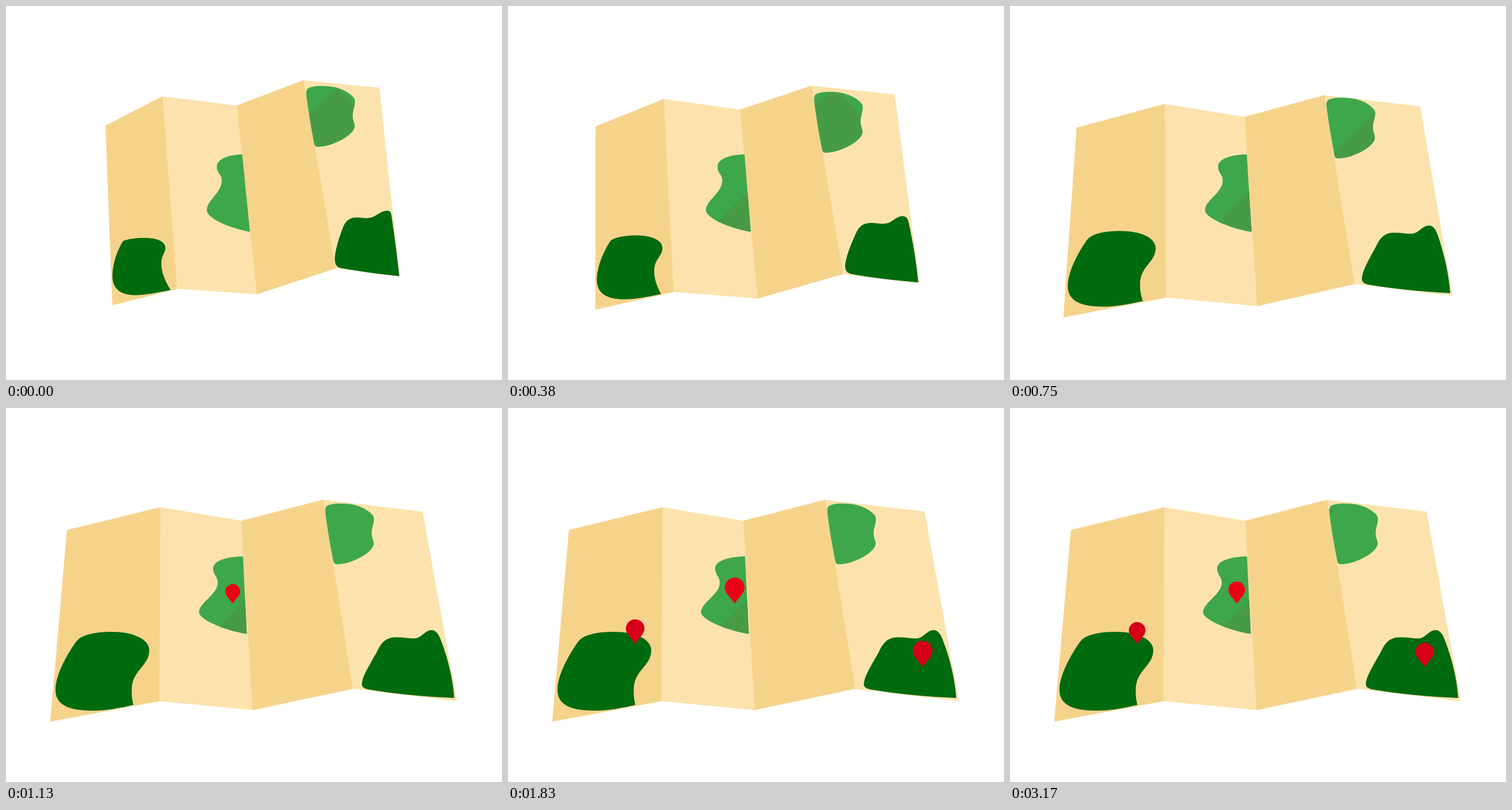
Animation, 862 px wide and 650 px high, one loop 6.58 s. Source, as an HTML page with a canvas:

```html
<!DOCTYPE html>
<html lang="en">
<head>
<meta charset="utf-8">
<title>Unfolding map</title>
<style>
  html, body { margin: 0; width: 100%; height: 100%; overflow: hidden; background: #fff; }
  canvas { display: block; }
</style>
</head>
<body>
<canvas id="stage" width="862" height="650"></canvas>
<script>
const ctx = document.getElementById('stage').getContext('2d');
const LOOP = 6580, FPS = 24, LAST_FRAME = 76, UNFOLD_FRAMES = 24;

const COLOR = {
  paper: '#fce3ad', fold: '#f6d38b', forest: '#006a0f',
  meadow: '#3ea74b', shade: '#479b46'
};

// Each shape is a pair: folded and unfolded.
const topEdge = ['173,208 272,157 401,173 517,129 649,142',
                 '106,212 268.5,172.5 409,196 551,159.5 724,180'];
const bottomEdge = ['185,520 297.5,491.5 436,501 573,456 684,470',
                    '77,545 266.5,509.5 428.5,525 603,488 783.5,509.5'];

const leftForest = [
  'M204,408 C212,405 226,403 240,403 C262,403 277,409 277,420 C277,430 270,433 270,447 ' +
  'C270,463 276,477 286,493.5 C264,498 243,502.5 225,502.5 C200,502.5 185,492 185,470 C185,448 194,422 204,408Z',
  'M122,406 C132,393 158,389 183,389 C222,389 249,402 249,421 C249,449 218.5,455 218.5,490 ' +
  'C218.5,500 219,507 221.5,516 C200,521 175,526 150,526 C108,526 86,515 86,490 C86,463 107,427 122,406Z'];
const rightForest = [
  'M571.5,440 C571.5,425 581,396 586,384 C591,372 598,368 609,367.5 C618,367 623,370 633,368 ' +
  'C643,366 650,357 660,356 C667,355 669,358 670,365 C675,400 680,435 683.5,469.5 C648,466 612,461 580,455 C574,453 571.5,448 571.5,440Z',
  'M618.5,480 C618.5,466 636,440 645,423 C652,408 660,399 676,398.5 C690,398 701,401 711,400.5 ' +
  'C723,399 727,387 739,386 C747,385.5 752,393 756,404 C768,435 777,472 779,504 C730,502 675,497 629,489 C622,487 618.5,485 618.5,480Z'];
const middleMeadow = [
  'M410.5,258 C392,258 366,264 366.5,280 C367,292 375,292 375,303 C375,325 349,337 349,355 C349,369 388,386 424,392.5Z',
  'M412,258 C388,258 360,264 360,279 C360,291 368,292 368,304 C368,324 335.5,338 335.5,355 C335.5,367 377,386 418.5,392.5Z'];
const rightMeadow = new Path2D(
  'M522,155 C521,146 523,142 532,140.5 C543,138 560,139 571,141 C588,145 600,153 605.5,161 ' +
  'C609,170 602,180 602.5,192 C603,201 606,202 606,209 C605,224 570,243 545,244.5 ' +
  'C539,245 537.5,244 536,240 C531,215 525,180 522,155Z');

// Unit pin: head radius 1, tip at the origin.
const pinShape = new Path2D('M0,0 C-.42,-.65 -1,-1.05 -1,-1.63 A1,1 0 0 1 1,-1.63 C1,-1.05 .42,-.65 0,0Z');
const pins = [
  { x: 394, y: 340, radius: 17.4, start: 24, color: '#ee0014' },
  { x: 221, y: 410, radius: 17.2, start: 32, color: '#d60018' },
  { x: 720.7, y: 450, radius: 19, start: 40, color: '#d60018' }
];

const clamp = v => Math.min(1, Math.max(0, v));
const lerp = (a, b, k) => a + (b - a) * k;
const easeSine = k => (1 - Math.cos(Math.PI * clamp(k))) / 2;

function morph([from, to], k) {
  const ends = to.match(/[\d.]+/g);
  let i = 0;
  return from.replace(/[\d.]+/g, v => lerp(+v, +ends[i++], k));
}

function keyed(frame, keys) {
  for (let i = 1; i < keys.length; i++) {
    const [f0, v0] = keys[i - 1], [f1, v1] = keys[i];
    if (frame <= f1) return lerp(v0, v1, (frame - f0) / (f1 - f0));
  }
  return keys[keys.length - 1][1];
}

function fill(path, color) {
  ctx.fillStyle = color;
  ctx.fill(path);
}

// Shades the part of a meadow where x + y > sum and x - y < diff.
function drawMeadow(path, sum, diff = 900) {
  fill(path, COLOR.meadow);
  const x = (sum + diff) / 2, y = (sum - diff) / 2, far = 900;
  ctx.save();
  ctx.clip(path);
  fill(new Path2D(`M${x},${y} l${far},${far} h${-2 * far}Z`), COLOR.shade);
  ctx.restore();
}

function drawPaper(open) {
  const top = morph(topEdge, open).split(' ');
  const bottom = morph(bottomEdge, open).split(' ');
  const polygon = points => new Path2D(`M${points.join('L')}Z`);
  fill(polygon([...top, ...bottom.slice().reverse()]), COLOR.paper);
  for (const i of [0, 2]) {
    fill(polygon([top[i], top[i + 1], bottom[i + 1], bottom[i]]), COLOR.fold);
  }
}

function pinScale(age) {
  const peak = 7.5, overshoot = .16;
  if (age <= 0) return 0;
  if (age < peak) return (1 + overshoot) * (1 - (1 - age / peak) ** 2);
  if (age < 28) {
    const since = age - peak;
    return 1 + overshoot * Math.exp(-.21 * since) * Math.cos(Math.PI * since / 4);
  }
  return 1 - .16 * easeSine((age - 32) / 4);
}

function drawPin({ x, y, radius, start, color }, frame) {
  const size = radius * pinScale(frame - start);
  if (!size) return;
  ctx.save();
  ctx.translate(x, y);
  ctx.scale(size, size);
  fill(pinShape, color);
  ctx.restore();
}

function draw(frame) {
  const steady = clamp(frame / UNFOLD_FRAMES);
  const open = easeSine(steady);
  ctx.clearRect(0, 0, 862, 650);
  drawPaper(open);
  fill(new Path2D(morph(leftForest, open)), COLOR.forest);
  fill(new Path2D(morph(rightForest, open)), COLOR.forest);
  drawMeadow(new Path2D(morph(middleMeadow, steady)),
    keyed(frame, [[0, 830], [9, 740], [18, 738], [27, 750]]));

  ctx.save();
  ctx.translate(33 * open, 27 * steady);
  drawMeadow(rightMeadow,
    keyed(frame, [[0, 717], [9, 686], [18, 771], [24, 840]]),
    keyed(frame, [[0, 435], [9, 425], [18, 520]]));
  ctx.restore();

  for (const pin of pins) drawPin(pin, frame);
}

const begin = performance.now();
function tick() {
  const time = (performance.now() - begin) % LOOP;
  draw(Math.min(LAST_FRAME, Math.floor((time + 5) * FPS / 1000)));
  requestAnimationFrame(tick);
}
tick();
</script>
</body>
</html>
```
